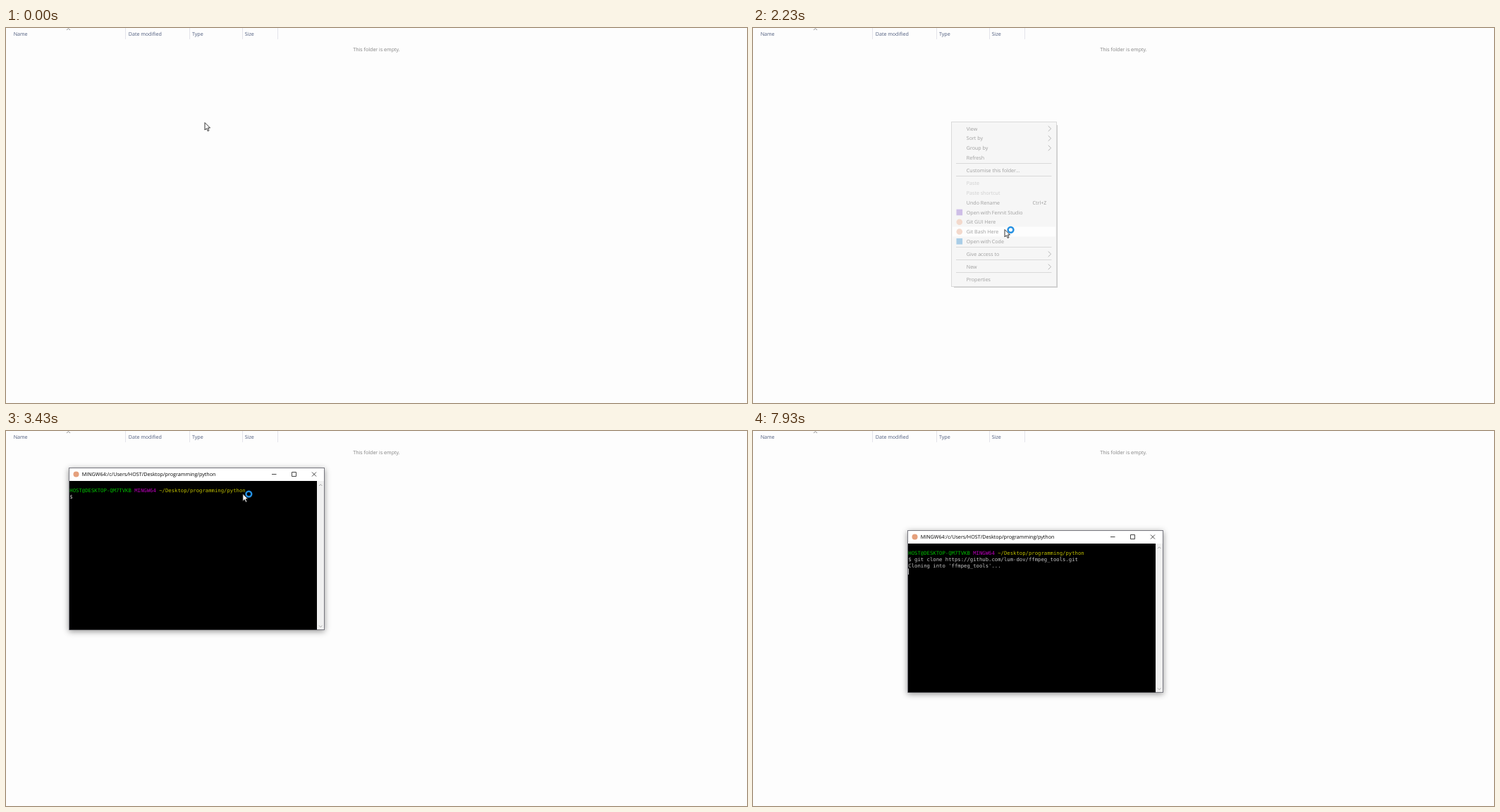
Animation, 1051 px wide and 533 px high, one loop 8000 ms. Source, as an HTML page:

```html
<!DOCTYPE html>
<html lang="en">
<head>
<meta charset="utf-8">
<title>Cloning a repository</title>
<style>
  html, body { margin: 0; width: 100%; height: 100%; overflow: hidden; background: #fdfdfd; }
  svg { display: block; }
  text { font: 7.1px "Open Sans", sans-serif; text-rendering: geometricPrecision; white-space: pre; }
  .head { fill: #4c5a7c; }
  .dim { fill: #808080; }
  .title { font-size: 7.18px; }
  .term text { font: 7.28px "DejaVu Sans Mono", monospace; fill: #c4c4c4; }
  .line { fill: none; stroke: #333; stroke-width: .9; }
  .soft { stroke: #a0a0a0; }
  #win { filter: drop-shadow(0 2px 4px rgba(0, 0, 0, .42)); }
</style>
</head>
<body>
<svg width="1051" height="533" viewBox="0 0 1051 533">
  <g id="folder"></g>
  <g id="menu">
    <path d="M285 367H430V138H432V369H285Z" fill="#777"/>
    <rect x="281.5" y="133.5" width="149" height="234" fill="#ededed" stroke="#a2a2a2"/>
    <rect id="hover" x="283" width="146" height="13.8" fill="#fff"/>
    <g id="items"></g>
  </g>
  <g id="win">
    <rect x=".5" y=".5" width="362" height="230" fill="#fff" stroke="#77777f"/>
    <rect x="1" y="19" width="351" height="211.5" fill="#000"/>
    <rect x="352" y="19" width="10" height="211" fill="#f0f0f0"/>
    <circle cx="10.5" cy="9.5" r="4" fill="#e5a07c"/>
    <text class="title" x="18.7" y="12.2">MINGW64:/c/Users/HOST/Desktop/programming/python</text>
    <path class="line" d="M288 9.5h6.5M316.5 6.5h6v6h-6zM345 6.5l6 6m0-6l-6 6"/>
    <path class="line soft" d="M355 26l2.2-2.2 2.2 2.2M355 224.5l2.2 2.2 2.2-2.2"/>
    <g class="term">
      <text x="1.3" y="35"><tspan fill="#00bf00">HOST@DESKTOP-QM7TVKB</tspan> <tspan fill="#bf00bf">MINGW64</tspan> <tspan fill="#bfbf00">~/Desktop/programming/python</tspan></text>
      <text id="command" x="1.3" y="43.8"></text>
      <text id="reply" x="1.3" y="52.5"></text>
      <rect id="caret" width=".9" height="8.6" fill="#d0d0d0"/>
    </g>
  </g>
  <g id="mouse">
    <path d="M0 0V10.4L2.5 8.2 4.2 12 5.9 11.2 4.3 7.5H7.5Z" fill="#fff" stroke="#111" stroke-width=".85"/>
    <circle id="busy" cx="8.5" cy=".3" r="3.9" fill="none" stroke="#2490e2" stroke-width="2.5"/>
  </g>
</svg>
<script>
const $ = id => document.getElementById(id);
const LOOP = 8000, CELL = 4.383, LINE = 8.75, ITEM = 13.75;

const label = (x, y, text, cls = '') => `<text class="${cls}" x="${x}" y="${y + 2.6}">${text}</text>`;

// Folder view
const columns = [['Name', 10.7], ['Date modified', 173.8], ['Type', 264], ['Size', 338.8]];
$('folder').innerHTML =
  columns.map(([name, x]) => label(x, 8, name, 'head')).join('') +
  '<path d="M169.5 0V16M260.5 0V16M335.5 0V16M385.5 0V16" stroke="#e4e4ea"/>' +
  '<path class="line" d="M86 3L88.5 .5 91 3" style="stroke:#888"/>' +
  `<g text-anchor="middle">${label(525.5, 30, 'This folder is empty.', 'dim')}</g>`;

// Context menu: [text, options], null is a separator
const entries = [
  ['View', { sub: 1 }], ['Sort by', { sub: 1 }], ['Group by', { sub: 1 }], ['Refresh'], null,
  ['Customise this folder...'], null,
  ['Paste', { dim: 1 }], ['Paste shortcut', { dim: 1 }], ['Undo Rename', { key: 'Ctrl+Z' }],
  ['Open with Fennit Studio', { icon: '#8257c4' }], ['Git GUI Here', { icon: '#e5a07c', round: 1 }],
  ['Git Bash Here', { icon: '#e5a07c', round: 1 }], ['Open with Code', { icon: '#2080c4' }], null,
  ['Give access to', { sub: 1 }], null, ['New', { sub: 1 }], null, ['Properties']
];
const itemTops = [];
let itemTop = 136.2, itemMarkup = '';
for (const entry of entries) {
  if (!entry) {
    itemMarkup += `<path d="M288 ${Math.round(itemTop + 2) - .5}H423.5" stroke="#a0a0a0"/>`;
    itemTop += 4.4;
    continue;
  }
  const [text, o = {}] = entry, y = itemTop + 6.9;
  itemMarkup += label(302.8, y, text, o.dim ? 'dim' : '');
  if (o.sub) itemMarkup += `<path class="line" d="M418.7 ${y - 3.8}l4 3.8-4 3.8"/>`;
  if (o.key) itemMarkup += label(396.5, y, o.key);
  if (o.icon) itemMarkup += `<rect x="288.5" y="${y - 4.2}" width="8.6" height="8.6" rx="${o.round ? 4.3 : 0}" fill="${o.icon}"/>`;
  itemTops.push(itemTop);
  itemTop += ITEM;
}
$('items').innerHTML = itemMarkup;

// Timing helpers
const ramp = (t, from, to) => Math.min(1, Math.max(0, (t - from) / (to - from)));
const smooth = u => u * u * (3 - 2 * u);
const mix = (a, b, u) => a + (b - a) * u;
const easeOut = (u, power) => 1 - (1 - u) ** power;
const show = (el, on) => { el.style.display = on ? '' : 'none'; };

const keyTimes = [4600, 4750, 4900, 5120, 5260, 5400, 5520, 5640, 5760, 5880];
const PASTE = 7100, ENTER = 7720;
const TYPED = 'git clone ', PASTED = 'https://github.com/lum-dov/ffmpeg_tools.git';

function windowAt(t) {
  const u = ramp(t, 3346, 3796);
  return [mix(-81, 219, easeOut(u, 4)), mix(-45, 141, easeOut(u, 3.5))];
}

function mouseAt(t) {
  if (t > 2850) {               // dragging: the window trails the pointer
    const [x, y] = windowAt(t + 30);
    return [x + 209, y + 14.5];
  }
  if (t > 2330) {
    const u = smooth(ramp(t, 2400, 2800));
    return [mix(355.5, 128, u), mix(286.5, -31, u)];
  }
  const nudge = ramp(t, 30, 200), u = smooth(ramp(t, 800, 1600)), back = ramp(t, 2200, 2330);
  return [mix(282 - nudge * .7, 357.5, u) - 2 * back, mix(134.5 - nudge, 286.5, u)];
}

function drawTerminal(t) {
  const count = keyTimes.filter(k => k <= t).length;
  const command = '$ ' + TYPED.slice(0, count) + (t >= PASTE ? PASTED : '');
  const entered = t >= ENTER;
  $('command').textContent = command;
  $('reply').textContent = entered ? "Cloning into 'ffmpeg_tools'..." : '';
  const lastInput = Math.max(...[3500, ...keyTimes, PASTE, ENTER].filter(k => k <= t));
  $('caret').setAttribute('x', 1.1 + (entered ? 0 : command.length * CELL));
  $('caret').setAttribute('y', 37 + (entered ? 2 * LINE : 0));
  show($('caret'), t >= 3500 && (t - lastInput) % 1000 < 500);
}

function draw(t) {
  const [mx, my] = mouseAt(t), [wx, wy] = windowAt(t);

  const menuAlpha = ramp(t, 680, 830) * (1 - ramp(t, 2150, 2280));
  show($('menu'), menuAlpha > 0);
  $('menu').style.opacity = menuAlpha;
  const hovered = itemTops.find(y => my >= y && my < y + ITEM);
  show($('hover'), hovered !== undefined);
  if (hovered) $('hover').setAttribute('y', hovered);

  const opening = ramp(t, 2290, 2380), scale = mix(.93, 1, easeOut(opening, 3));
  show($('win'), opening > 0);
  $('win').style.opacity = opening;
  $('win').setAttribute('transform',
    `translate(${Math.round(wx)} ${Math.round(wy)}) translate(181.5 115.5) scale(${scale}) translate(-181.5 -115.5)`);
  drawTerminal(t);

  show($('mouse'), t < keyTimes[0]);
  $('mouse').setAttribute('transform', `translate(${mx} ${my})`);
  show($('busy'), t >= 1750 && t < 4170);
}

function tick() {
  draw(performance.now() % LOOP);
  requestAnimationFrame(tick);
}
tick();
</script>
</body>
</html>
```
